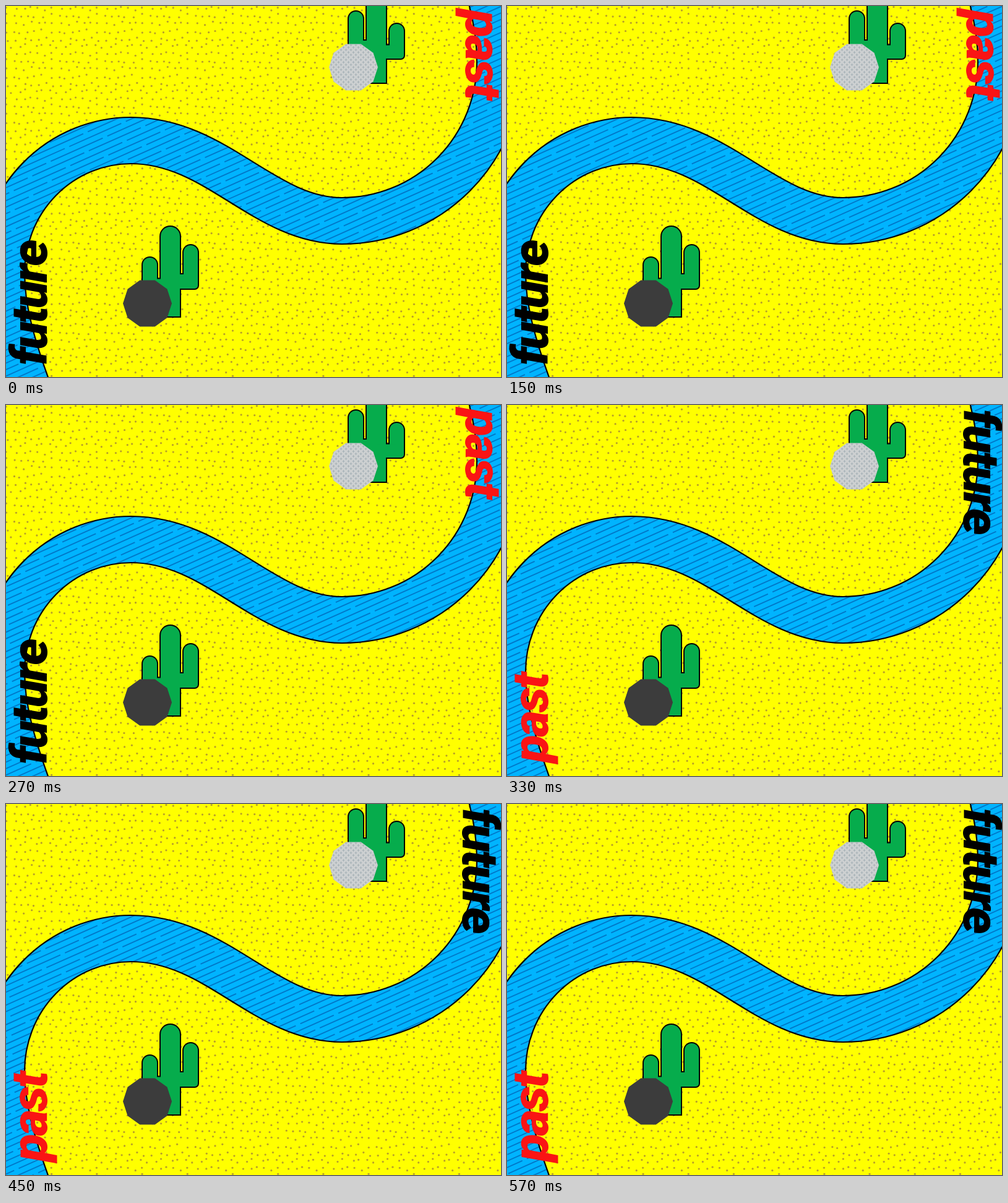
Write an HTML page with a canvas that moves like this. It is 800x600 px and loops after 0.6 s.

```html
<!DOCTYPE html>
<html lang="en">
<head>
<meta charset="utf-8">
<title>Past and future</title>
<style>
html, body { margin: 0; width: 100%; height: 100%; overflow: hidden; background: #ff0; }
canvas { display: block; }
</style>
</head>
<body>
<canvas id="stage" width="800" height="600"></canvas>
<script>
const W = 800, H = 600, LOOP = 600, STEP = 30;
const ctx = document.getElementById('stage').getContext('2d');

function layer() {
  const canvas = document.createElement('canvas');
  canvas.width = W;
  canvas.height = H;
  return canvas.getContext('2d');
}

function random(seed) {
  return () => {
    seed = (seed * 16807) % 2147483647;
    return seed / 2147483647;
  };
}

// A repeating tile of scattered dots
function drawSand(g) {
  const rnd = random(71), cell = 12.2, n = 6;
  const tile = Array.from({ length: n * n }, () => [rnd() * 8, rnd() * 8]);
  g.fillStyle = '#ff0';
  g.fillRect(0, 0, W, H);
  g.fillStyle = '#b8a02a';
  for (let r = 0; r * cell < H; r++) {
    for (let c = -1; c * cell < W; c++) {
      const [dx, dy] = tile[(r % n) * n + (c + n) % n];
      g.beginPath();
      g.arc(c * cell + dx + (r % 2) * cell / 2, r * cell + dy, 1.6, 0, 7);
      g.fill();
    }
  }
}

// Centre line of the river: two quarter ellipses joined by an S bend
const river = new Path2D();
river.moveTo(33, 614);
river.bezierCurveTo(10, 550, -7.5, 490, -7.5, 432);
river.ellipse(202, 432, 209.5, 214.5, 0, Math.PI, 1.5 * Math.PI);
river.bezierCurveTo(340, 217.5, 417, 347.5, 543, 347.5);
river.ellipse(543, 90, 255.5, 257.5, 0, Math.PI / 2, 0, true);
river.bezierCurveTo(798.5, 60, 794, 25, 785, -10);

function strokeRiver(g, color, width) {
  g.strokeStyle = color;
  g.lineWidth = width;
  g.stroke(river);
}

const water = layer();

function drawRiver(t) {
  const dash = 92, gap = 8, period = dash + gap;
  strokeRiver(ctx, '#000', 77.2);
  water.clearRect(0, 0, W, H);
  water.save();
  strokeRiver(water, '#00b4ff', 72.8);
  water.globalCompositeOperation = 'source-atop';
  water.rotate(-24 * Math.PI / 180);
  water.strokeStyle = '#0078c8';
  water.lineWidth = 1.9;
  water.setLineDash([dash, gap]);
  for (let i = 0; i < 95; i++) {
    const y = i * 9.6 - 10;
    water.lineDashOffset = (i * 37) % period + t / LOOP * period;
    water.beginPath();
    water.moveTo(-300, y);
    water.lineTo(W, y);
    water.stroke();
  }
  water.restore();
  ctx.drawImage(water.canvas, 0, 0);
}

function drawCactus(g, x, y, flip) {
  g.save();
  g.translate(x, y);
  g.scale(flip, 1);
  const layers = [['#000', 1], ['#06ac4c', -1]];
  for (const [color, grow] of layers) {
    const block = (x, y, w, h, top = 0, foot = 0) => {
      g.beginPath();
      g.roundRect(x - grow, y - grow, w + 2 * grow, h + 2 * grow,
        [top, top, foot, foot].map(r => r && r + grow));
      g.fill();
    };
    g.fillStyle = color;
    block(-16.5, 0, 33, 147, 16.5);
    block(-45.5, 50, 25, 58, 12.5, 6);
    block(20.5, 30, 25, 72, 12.5, 6);
    block(-34, 84.5, 34, 23.5);
    block(0, 77, 34, 25);
  }
  g.restore();
}

function drawRock(g, x, y, fill, speckled) {
  g.save();
  g.beginPath();
  for (let i = 0; i < 10; i++) {
    const a = i * Math.PI / 5;
    g.lineTo(x + 39.5 * Math.cos(a), y + 39.5 * Math.sin(a));
  }
  g.closePath();
  g.fillStyle = fill;
  g.fill();
  if (speckled) {
    g.clip();
    g.fillStyle = '#9daab0';
    for (let r = -10; r <= 10; r++) {
      for (let c = -5; c <= 5; c++) {
        const px = x + c * 8 + (r & 1) * 4, py = y + r * 4;
        g.fillRect(px - 2, py - 0.4, 4, 0.8);
        g.fillRect(px - 0.4, py - 2, 0.8, 4);
      }
    }
  }
  g.restore();
}

function drawWord(word, color, x, y, turn) {
  ctx.save();
  ctx.translate(x, y);
  ctx.rotate(turn * Math.PI / 2);
  ctx.font = 'italic 900 semi-condensed 82px Roboto, "Open Sans", sans-serif';
  ctx.letterSpacing = '-3px';
  ctx.fillStyle = color;
  ctx.fillText(word, 0, 0);
  ctx.restore();
}

const sand = layer(), things = layer();
drawSand(sand);
drawCactus(things, 265.5, 356, 1);
drawCactus(things, 598.5, -22, -1);
drawRock(things, 228.5, 481, '#3c3c3c');
drawRock(things, 561.5, 99, '#cdd0d1', true);

function draw(now) {
  const t = Math.floor(now % LOOP / STEP) * STEP;
  ctx.drawImage(sand.canvas, 0, 0);
  drawRiver(t);
  ctx.drawImage(things.canvas, 0, 0);
  if (t < LOOP / 2) {
    drawWord('future', '#000', 66, 581, -1);
    drawWord('past', '#fa1414', 743, 6, 1);
  } else {
    drawWord('past', '#fa1414', 66, 578, -1);
    drawWord('future', '#000', 738, 7, 1);
  }
}

const start = performance.now();
function tick() {
  draw(performance.now() - start);
  requestAnimationFrame(tick);
}
tick();
</script>
</body>
</html>
```
